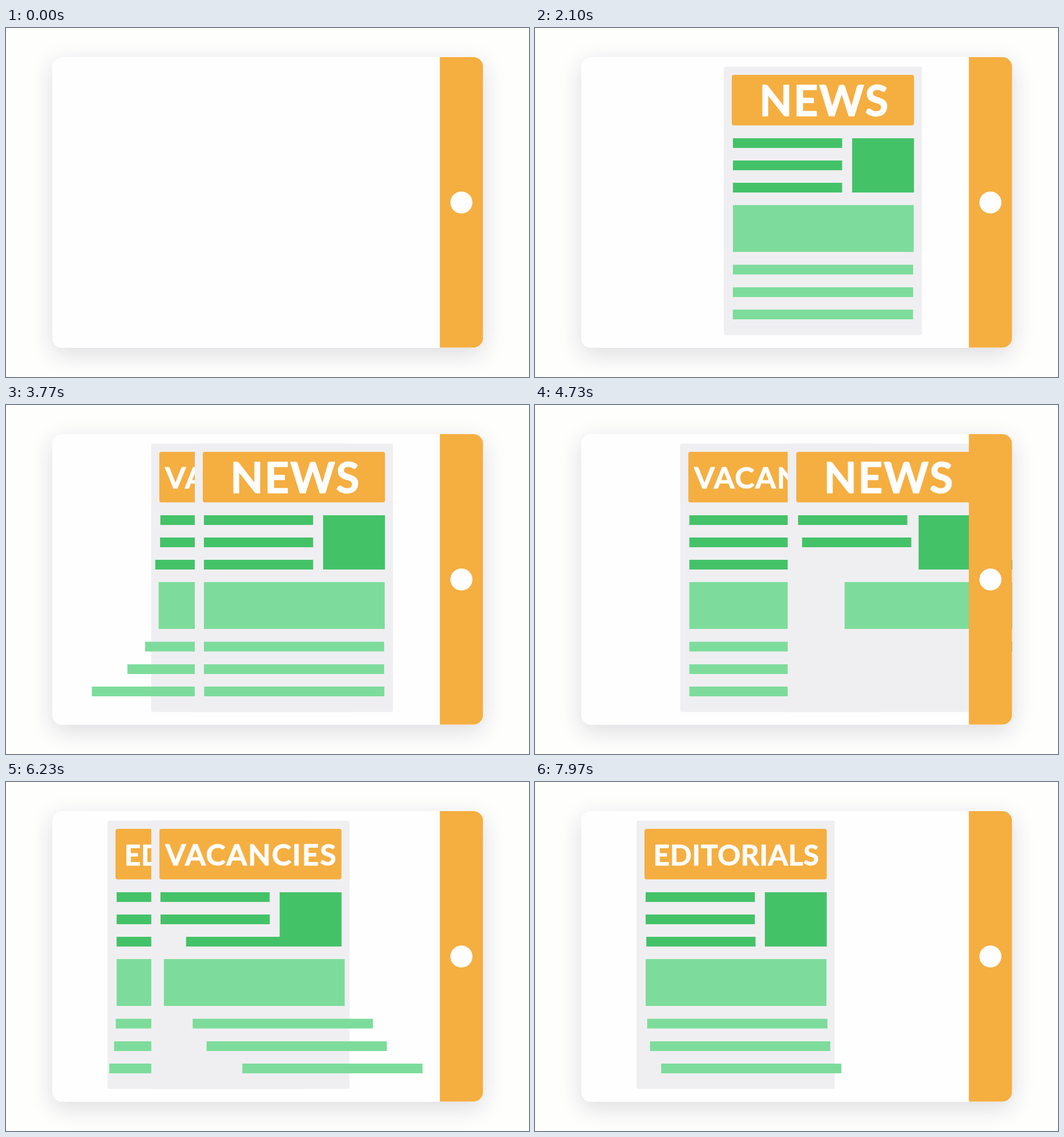
An HTML page for the animation above (8 s loop, 917 px wide and 611 px high).

```html
<!DOCTYPE html>
<html lang="en">
<head>
<meta charset="utf-8">
<title>News tablet</title>
<style>
  html, body { margin: 0; width: 100%; height: 100%; overflow: hidden; background: #fefefd; }
  .device {
    position: absolute; left: 81px; top: 51px; width: 755.5px; height: 508.5px;
    border-radius: 17px; background: #fefefe;
    box-shadow: 0 11px 40px rgba(30, 30, 55, .15);
  }
  svg { position: absolute; left: 0; top: 0; display: block; }
  text {
    font-family: Lato, Carlito, sans-serif; font-weight: 700; text-anchor: middle;
    fill: #fefefe; stroke: #fefefe; stroke-linejoin: round;
  }
</style>
</head>
<body>
<div class="device"></div>
<svg width="917" height="611" viewBox="0 0 917 611">
  <defs>
    <clipPath id="screen"><rect x="81" y="51" width="755.5" height="508.5" rx="17"/></clipPath>
  </defs>
  <g clip-path="url(#screen)">
    <g id="pages"></g>
    <rect x="760.7" y="51" width="76" height="509" fill="#f5ae40"/>
    <circle cx="798.5" cy="305.5" r="19.3" fill="#fefefe"/>
  </g>
</svg>
<script>
const LOOP = 8000, STEPS = 320;
const PAPER = '#efeff1', ORANGE = '#f5ae40', GREEN = '#44c268', MINT = '#7ddc9b';

// Parts in order of arrival; leave = delay after the page starts to go.
const parts = [
  { x: 0,   y: 67.5, w: 347.5, h: 470, fill: PAPER,  leave: 516, r: 4 },
  { x: 14,  y: 82,  w: 319.5, h: 88.5, fill: ORANGE, leave: 514, r: 4, title: true },
  { x: 16,  y: 193, w: 191.5, h: 17,  fill: GREEN,   leave: 512 },
  { x: 225, y: 193, w: 108.5, h: 95,  fill: GREEN,   leave: 508 },
  { x: 16,  y: 232, w: 191.5, h: 17,  fill: GREEN,   leave: 500 },
  { x: 16,  y: 310, w: 317,   h: 82,  fill: MINT,    leave: 392 },
  { x: 16,  y: 271, w: 191.5, h: 17,  fill: GREEN,   leave: 203 },
  { x: 16,  y: 414.5, w: 316, h: 17,  fill: MINT,    leave: 170 },
  { x: 16,  y: 454, w: 316,   h: 17,  fill: MINT,    leave: 112 },
  { x: 16,  y: 493, w: 316,   h: 17,  fill: MINT,    leave: 0 }
];

// Back to front; settle = when each part comes to rest.
const pages = [
  { title: 'EDITORIALS', x: 178, size: 50, spacing: .5, mid: 175, base: 145.5, go: 7690,
    settle: [5937, 6020, 6052, 6089, 6170, 6300, 6450, 6599, 6673, 6759] },
  { title: 'VACANCIES', x: 254.6, size: 52, spacing: 1.6, mid: 175, base: 145.5, go: 5684,
    settle: [3450, 3600, 3840, 3960, 4077, 4184, 4267, 4367, 4449, 4537] },
  { title: 'NEWS', x: 331, size: 75, spacing: 2, mid: 176.5, base: 153.5, go: 3720,
    settle: [1030, 1200, 1631, 1766, 1930, 2024, 2110, 2200, 2285, 2370] }
];

function add(parent, tag, attrs) {
  const el = document.createElementNS('http://www.w3.org/2000/svg', tag);
  for (const key in attrs) el.setAttribute(key, attrs[key]);
  return parent.appendChild(el);
}

const slideIn = ms => -Math.min(1000, Math.pow(Math.max(0, ms) / 345, 6));
const slideOut = ms => Math.min(1000, Math.pow(Math.max(0, ms) / 75, 2.5));

// Samples the slide curves into one looping animation.
function slide(el, x, settle, go) {
  const frames = Array.from({ length: STEPS + 1 }, (_, i) => {
    const t = LOOP * i / STEPS;
    const left = x + slideIn(settle - t) + slideOut(t - go);
    return { offset: i / STEPS, transform: `translateX(${left.toFixed(2)}px)` };
  });
  el.animate(frames, { duration: LOOP, iterations: Infinity });
}

const root = document.getElementById('pages');
for (const page of pages) {
  const layer = add(root, 'g', {});
  parts.forEach((p, i) => {
    const g = add(layer, 'g', {});
    add(g, 'rect', { x: p.x, y: p.y, width: p.w, height: p.h, rx: p.r || 0, fill: p.fill });
    if (p.title) {
      add(g, 'text', {
        x: page.mid, y: page.base, 'font-size': page.size,
        'letter-spacing': page.spacing, 'stroke-width': page.size / 55
      }).textContent = page.title;
    }
    slide(g, page.x, page.settle[i], page.go + p.leave);
  });
}
</script>
</body>
</html>
```
